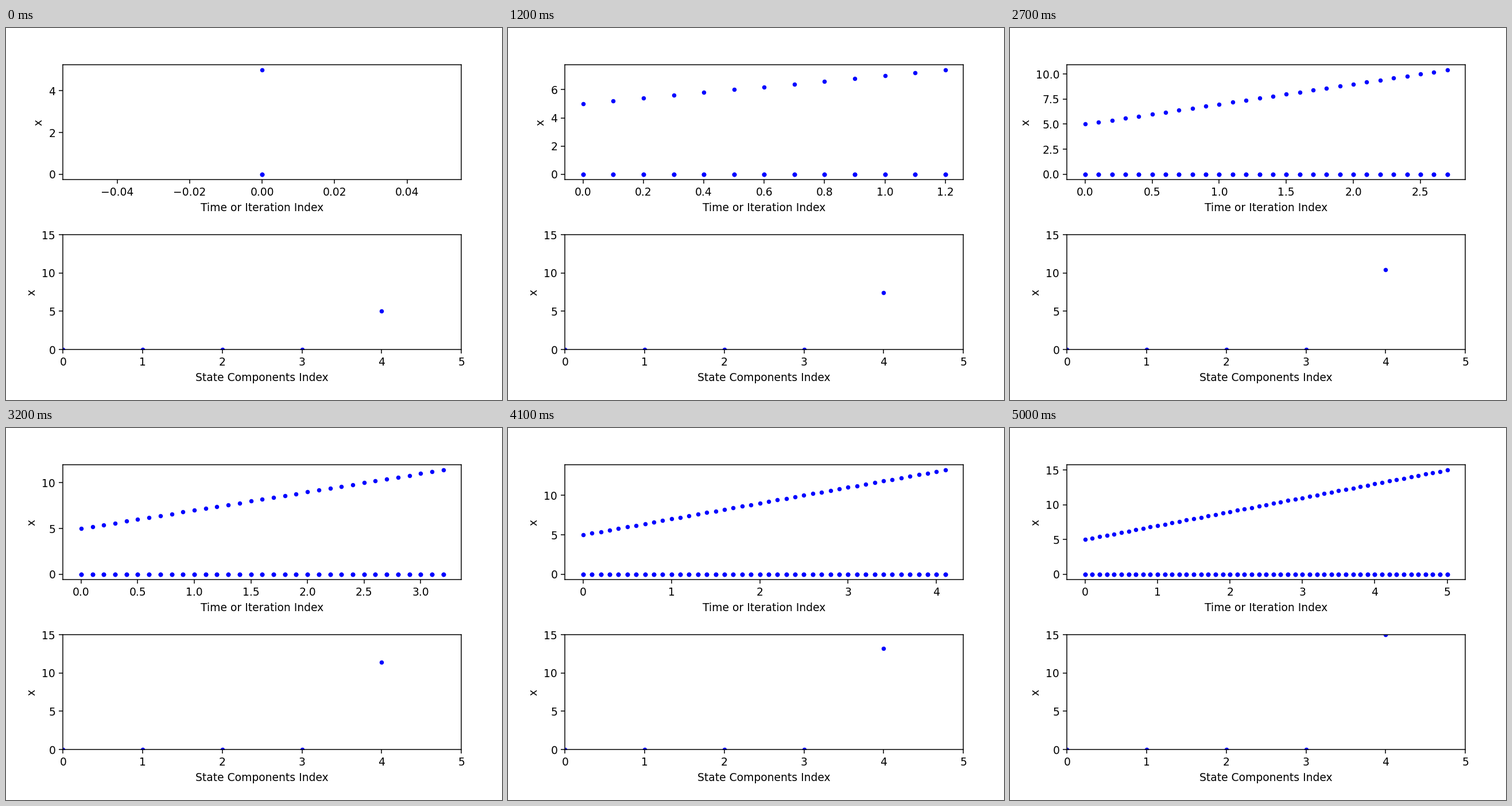
These frames come from a looping animation (864 px wide and 648 px high, 5100 ms). A matplotlib script:

```python
import numpy as np
import matplotlib.pyplot as plt
from matplotlib.animation import FuncAnimation

W, H, DPI = 864, 648, 135
FRAMES, STEP_MS = 51, 100
DT, START, RATE = 0.1, 5, 2
N = 5  # state components; only the last one grows

plt.rcParams["font.family"] = "DejaVu Sans"
fig = plt.figure(figsize=(W / DPI, H / DPI), dpi=DPI)


def add_panel(top, xlabel):
    left, width, height = 99.3, 693.9, 200
    ax = fig.add_axes([left / W, 1 - (top + height) / H, width / W, height / H])
    ax.set_xlabel(xlabel)
    ax.set_ylabel("x")
    return ax


history = add_panel(64, "Time or Iteration Index")
state = add_panel(360, "State Components Index")
state.set(xlim=(0, 5), ylim=(0, 15), yticks=range(0, 16, 5))

traces = [history.plot([], [], "b.")[0] for _ in range(N)]
dots, = state.plot([], [], "b.")


def states(t):
    x = np.zeros((N, len(t)))
    x[-1] = START + RATE * t
    return x


def update(i):
    t = np.arange(i + 1) * DT
    x = states(t)
    for trace, values in zip(traces, x):
        trace.set_data(t, values)
    history.relim()
    history.autoscale_view()
    dots.set_data(range(N), x[:, -1])
    return [*traces, dots]


anim = FuncAnimation(fig, update, frames=FRAMES, interval=STEP_MS,
                     repeat=True, repeat_delay=0, blit=False)
plt.show()
```
